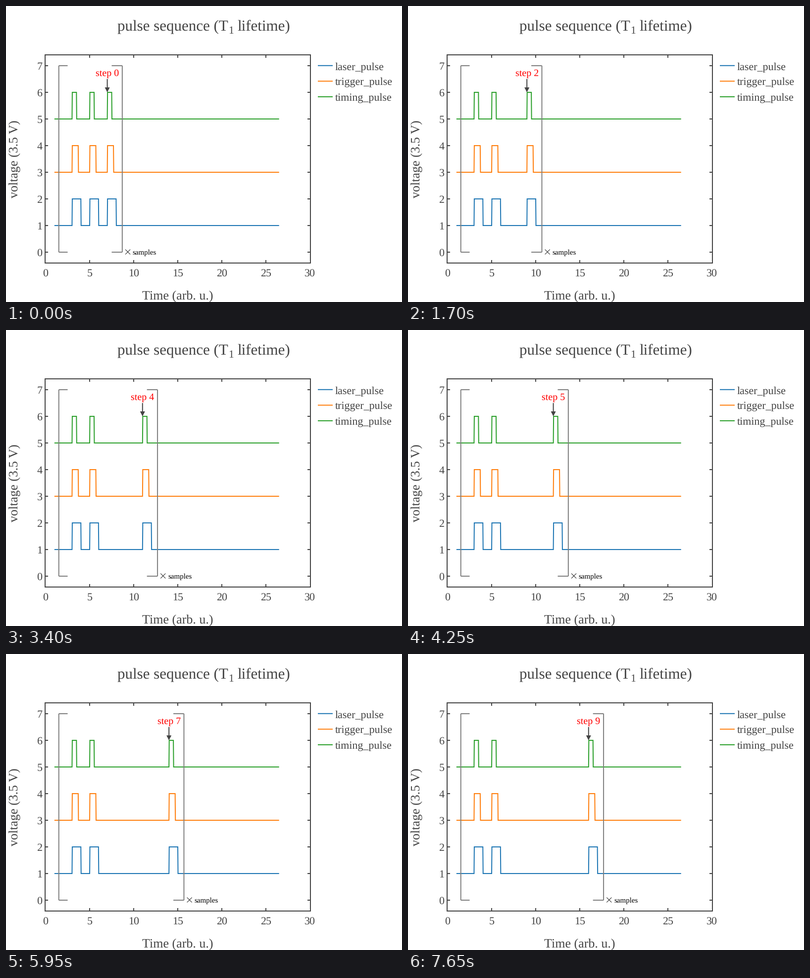
A matplotlib script for the animation above (8 s loop, 800x600 px).

```python
import matplotlib.pyplot as plt
from matplotlib.animation import FuncAnimation

W, H, DPI = 800, 600, 100
PX = 72 / DPI
INK, GRAY = "#444444", "#808080"
STEP_MS, TICK_MS, LOOP_MS = 850, 50, 8000
EDGE = 0.03

plt.rcParams["font.family"] = "Liberation Serif"
plt.rcParams["text.hinting"] = "none"

# name, colour, base level, pulse width
TRACES = [
    ("laser_pulse", "#1f77b4", 1, 1.0),
    ("trigger_pulse", "#ff7f0e", 3, 0.7),
    ("timing_pulse", "#2ca02c", 5, 0.5),
]

fig = plt.figure(figsize=(W / DPI, H / DPI), dpi=DPI, facecolor="white")
ax = fig.add_axes([0, 0, 1, 1])
ax.set_xlim(0, W)
ax.set_ylim(H, 0)
ax.axis("off")


def px(t):
    return 80 + 17.8 * t


def py(v):
    return 499 - 54 * v


def line(xs, ys, color, width=2, z=2, cap="butt"):
    return ax.plot(xs, ys, color=color, lw=width * PX, zorder=z, snap=False,
                   solid_capstyle=cap, solid_joinstyle="miter")[0]


def label(x, y, text, size, color=INK, ha="left", **kw):
    return ax.text(x, y, text, fontsize=size * PX, color=color, ha=ha,
                   va="baseline", zorder=5, **kw)


def pulse_train(base, width, starts):
    xs, ys = [1], [base]
    for s in starts:
        xs += [s, s + EDGE, s + width, s + width + EDGE]
        ys += [base, base + 1, base + 1, base]
    xs.append(26.5)
    ys.append(base)
    return [px(x) for x in xs], [py(y) for y in ys]


def draw_frame():
    left, right, top, bottom = 79, 615, 99, 521
    line([left, right, right, left, left], [top, top, bottom, bottom, top],
         INK, cap="projecting")
    for t in range(0, 31, 5):
        x = px(t)
        label(x, 548, str(t), 22, ha="center")
        if 0 < t < 30:
            line([x, x], [top, top + 6], INK)
            line([x, x], [bottom, bottom - 6], INK)
    for v in range(8):
        y = py(v)
        label(73.5, y + 7.7, str(v), 22, ha="right")
        line([left, left + 6], [y, y], INK)
        line([right, right - 6], [y, y], INK)


def draw_titles():
    label(225.4, 50, "pulse sequence (T", 31)
    label(449.2, 56.5, "1", 21.7)
    label(467.8, 50, "lifetime)", 31)
    label(347, 594, "Time (arb. u.)", 26, ha="center")
    ax.text(23, 310, "voltage (3.5 V)", fontsize=26 * PX, color=INK,
            rotation=90, rotation_mode="anchor", ha="center", va="baseline")


def draw_legend():
    for i, (name, color, _, _) in enumerate(TRACES):
        y = 120.8 + 31.6 * i
        line([630, 660], [y, y], color)
        label(665, y + 8.3, name, 22)


draw_frame()
draw_titles()
draw_legend()

line([px(1.5)] * 2, [py(0), py(7)], GRAY, z=3)
for v in (0, 7):
    line([px(1.5), px(2.5)], [py(v)] * 2, GRAY, z=3)

waves = [line([], [], color) for _, color, _, _ in TRACES]
wall = line([], [], GRAY, z=3)
arms = [line([], [], GRAY, z=3) for _ in range(2)]
cross = [line([], [], "#222222", 1, z=4) for _ in range(2)]
samples = label(0, 503.7, "samples", 15, "black")
step_text = label(0, 142, "", 20, "red", ha="center")
shaft = line([], [], INK, z=4)
head = ax.fill([0, 1, 0], [0, 0, 1], color=INK, lw=0, zorder=4)[0]


def update(frame):
    n = frame * TICK_MS // STEP_MS
    start = 7 + n
    for wave, (_, _, base, width) in zip(waves, TRACES):
        wave.set_data(*pulse_train(base, width, (3, 5, start)))

    edge = px(start + 1.7)
    wall.set_data([edge, edge], [py(0), py(7)])
    for arm, v in zip(arms, (0, 7)):
        arm.set_data([px(start + 0.5), edge], [py(v)] * 2)

    cx, cy, r = edge + 11.2, 498.5, 5
    cross[0].set_data([cx - r, cx + r], [cy - r, cy + r])
    cross[1].set_data([cx - r, cx + r], [cy + r, cy - r])
    samples.set_x(edge + 21)

    x = px(start)
    step_text.set_text(f"step {n}")
    step_text.set_x(x)
    shaft.set_data([x, x], [148, 168])
    head.set_xy([(x - 5, 165), (x + 5, 165), (x, 175)])
    return [*waves, wall, *arms, *cross, samples, step_text, shaft, head]


anim = FuncAnimation(fig, update, frames=LOOP_MS // TICK_MS,
                     interval=TICK_MS, repeat=True, repeat_delay=0)
plt.show()
```
